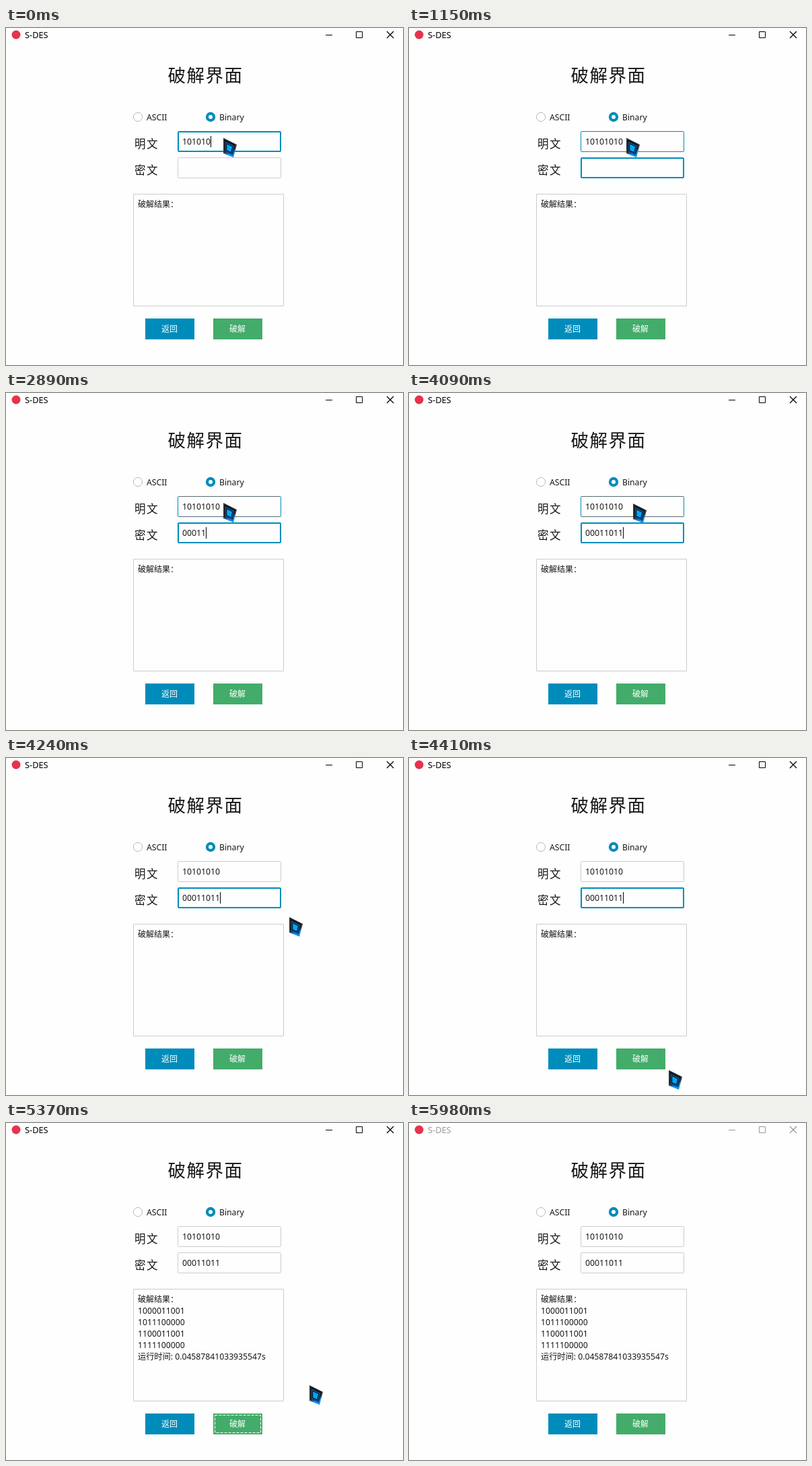
These frames come from a looping animation (590x500 px, 6.04 s). An HTML page with a canvas:

```html
<!DOCTYPE html>
<html lang="zh-CN">
<head>
<meta charset="utf-8">
<title>S-DES</title>
<style>
html, body { margin: 0; width: 100%; height: 100%; overflow: hidden; background: #fefefe; }
canvas { display: block; }
</style>
</head>
<body>
<canvas id="stage" width="590" height="500"></canvas>
<script>
const ctx = document.getElementById('stage').getContext('2d');
const LOOP = 6040, DIGIT = 7;
const BLUE = '#008cba', GREEN = '#43ac6a', BORDER = '#cccccc', INK = '#161616', PAPER = '#fefefe';
const FAMILY = '"Noto Sans", "Noto Sans CJK SC", "Noto Sans CJK", sans-serif';
const TAB = 560, PRESS = 4610, RELEASE = 4700, RESULT = 4760, BLUR = 5980;
const RESULTS = ['1000011001', '1011100000', '1100011001', '1111100000', '运行时间: 0.04587841033935547s'];

// keyTime gives the moment the i-th character appears.
const PLAIN = {
  text: '10101010', focusedAt: -290,
  keyTime: i => 150 + (i - 6) * 200
};
// Typing that starts fast, slows in the middle and speeds up again.
const CIPHER = {
  text: '00011011', focusedAt: TAB,
  keyTime: i => 1770 + i * 1860 / 7 - 130 * Math.sin(i * 2 * Math.PI / 7)
};

const linear = u => u;
const smooth = u => u * u * (3 - 2 * u);

// Bezier moves; the pointer is redrawn once per step.
const TO_BUTTON = {
  from: 4090, step: 32, begin: 4050, end: 4550, ease: smooth,
  path: [[323, 163], [520, 180], [410, 560], [348, 446]]
};
const TO_EXIT = {
  from: 5250, step: 30, begin: 5220, end: 5640, ease: linear,
  path: [[348, 446], [461, 332], [530, 409], [520, 502]]
};

function along({ from, step, begin, end, ease, path }, t) {
  const now = from + Math.floor((t - from) / step) * step;
  const u = ease(Math.min((now - begin) / (end - begin), 1)), v = 1 - u;
  const [a, b, c, d] = path;
  return [0, 1].map(k => Math.round(
    v * v * v * a[k] + 3 * v * v * u * b[k] + 3 * v * u * u * c[k] + u * u * u * d[k]));
}

function pointerAt(t) {
  if (t < TO_BUTTON.from) return TO_BUTTON.path[0];
  if (t < TO_EXIT.from) return along(TO_BUTTON, t);
  return t < TO_EXIT.end ? along(TO_EXIT, t) : null;
}

const inside = (p, x, y, w, h) => p && p[0] >= x && p[0] < x + w && p[1] >= y && p[1] < y + h;
const caretOn = (entry, t) => (t - entry.focusedAt) % 882 < 590;

function typed(entry, t) {
  return [...entry.text].filter((_, i) => entry.keyTime(i) <= t || (entry === PLAIN && i < 6)).join('');
}

function rect(x, y, w, h, color) {
  ctx.fillStyle = color;
  ctx.fillRect(x, y, w, h);
}

function box(x, y, w, h, color, line = 1, radius = 0) {
  ctx.strokeStyle = color;
  ctx.lineWidth = line;
  ctx.beginPath();
  ctx.roundRect(x + line / 2, y + line / 2, w - line, h - line, radius);
  ctx.stroke();
}

function text(str, x, y, color = INK, size = 12.2, spacing = 0) {
  ctx.font = `${size}px ${FAMILY}`;
  ctx.letterSpacing = spacing + 'px';
  ctx.fillStyle = color;
  ctx.fillText(str, x, y);
}

function circle(x, y, r, fill, stroke) {
  ctx.beginPath();
  ctx.arc(x, y, r, 0, Math.PI * 2);
  ctx.fillStyle = fill;
  ctx.fill();
  if (!stroke) return;
  ctx.strokeStyle = stroke;
  ctx.lineWidth = 1;
  ctx.stroke();
}

function line(x1, y1, x2, y2, color, width) {
  ctx.strokeStyle = color;
  ctx.lineWidth = width;
  ctx.beginPath();
  ctx.moveTo(x1, y1);
  ctx.lineTo(x2, y2);
  ctx.stroke();
}

function titleBar(active) {
  const ink = active ? '#000000' : '#999999';
  circle(15, 10, 6.5, '#e5344c');
  text('S-DES', 28, 15, ink, 12.8);
  rect(475, 10, 10, 1, ink);
  box(520, 5, 10, 10, ink);
  line(566, 5, 576, 15, ink, 1.2);
  line(576, 5, 566, 15, ink, 1.2);
}

function radio(x, label, selected) {
  if (selected) {
    circle(x, 132, 7.2, BLUE);
    circle(x, 132, 3, '#ffffff');
  } else circle(x, 132, 6.6, '#ffffff', '#b9b9b9');
  text(label, x + 13, 137);
}

function field(y, label, entry, t, focused, hovered) {
  const x = 255, w = 154, h = 31;
  text(label, 191, y + 25, INK, 16.5, 1.5);
  box(x, y, w, h, focused || hovered ? BLUE : BORDER, focused ? 2 : 1, 1);
  if (hovered && !focused) {
    rect(x + 1, y, w - 2, 1, '#5b6b73');
    rect(x + 1, y + h - 1, w - 2, 1, '#5b6b73');
  }
  const value = typed(entry, t);
  text(value, 262, y + 20, INK, 12.24);
  if (focused && caretOn(entry, t)) rect(262 + value.length * DIGIT, y + 7, 1, 17, '#000000');
}

function button(x, label, color, focused) {
  rect(x, 431, 73, 31, color);
  text(label, x + 24, 451, '#ffffff', 12);
  if (!focused) return;
  ctx.setLineDash([4, 2]);
  box(x + 2, 433, 69, 27, '#ffffff');
  ctx.setLineDash([]);
}

// Nested copies of one slanted quad, shrunk towards its centre.
function pointer([x, y]) {
  const quad = [[0, 0], [20, 10], [15, 29], [0, 23]], cx = 8.7, cy = 15.5;
  const layer = (scale, color, dx = 0, dy = 0) => {
    ctx.fillStyle = color;
    ctx.beginPath();
    for (const [px, py] of quad) {
      ctx.lineTo(x + cx + dx + (px - cx) * scale, y + cy + dy + (py - cy) * scale);
    }
    ctx.fill();
  };
  const shade = ctx.createLinearGradient(x + 4, y + 12, x + 10, y + 27);
  shade.addColorStop(0.5, '#33363b');
  shade.addColorStop(0.8, '#0a8cf5');
  layer(1, shade);
  layer(0.8, '#15171b', 0, -1.2);
  layer(0.62, '#0878d8');
  layer(0.52, '#04070c');
  layer(0.4, '#00a8ff');
}

function draw(t) {
  const tip = pointerAt(t);
  rect(0, 0, 590, 500, PAPER);
  titleBar(t < BLUR);
  text('破解界面', 240.5, 80, INK, 26.5, 1.5);
  radio(196, 'ASCII', false);
  radio(304, 'Binary', true);
  field(153, '明文', PLAIN, t, t < TAB, inside(tip, 255, 153, 154, 31));
  field(192, '密文', CIPHER, t, t >= TAB && t < PRESS, false);

  box(189, 246, 224, 167, BORDER);
  text('破解结果：', 196, 266, INK, 12);
  if (t >= RESULT) RESULTS.forEach((row, i) => text(row, 196, 283 + i * 17));

  const pressed = t >= PRESS && t < RELEASE;
  const hovered = inside(tip, 308, 431, 73, 31);
  button(207, '返回', BLUE, false);
  button(308, '破解', pressed ? '#69bd88' : hovered ? '#56b479' : GREEN, t >= PRESS && t < BLUR);

  if (tip) pointer(tip);
}

const start = performance.now();
function tick() {
  draw((performance.now() - start) % LOOP);
  requestAnimationFrame(tick);
}
tick();
</script>
</body>
</html>
```
